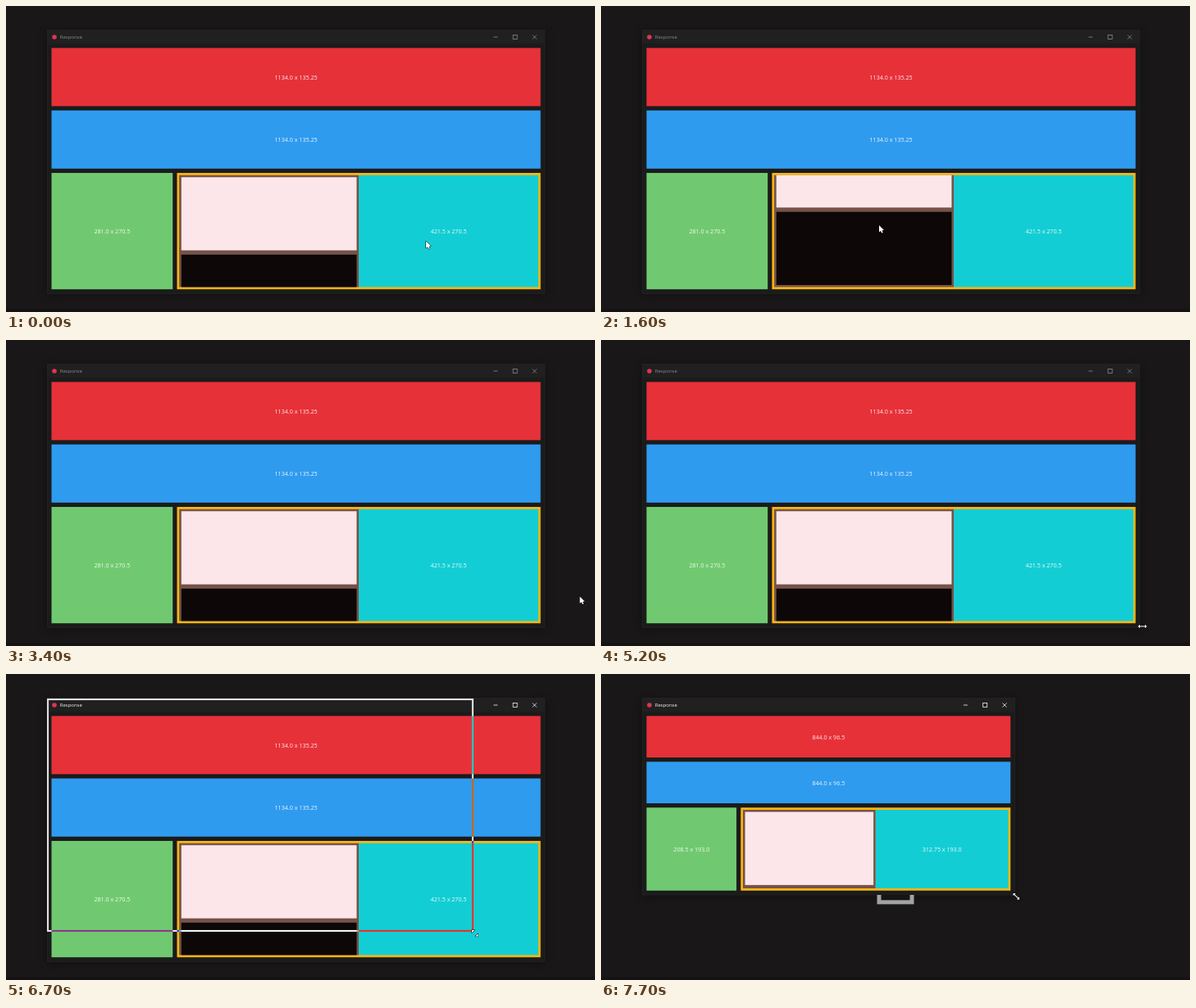
These frames come from a looping animation (718x374 px, 8 s). An HTML page with a canvas:

```html
<!DOCTYPE html>
<html lang="en">
<head>
<meta charset="utf-8">
<title>Response</title>
<style>
html, body { margin: 0; width: 100%; height: 100%; overflow: hidden; background: #191718; }
canvas { display: block; width: 718px; height: 374px; }
</style>
</head>
<body>
<canvas id="stage"></canvas>
<script>
const W = 718, H = 374, LOOP = 8000, STEP = 100;
const U = 0.5257; // stage pixels per layout unit
const GAP = 10 * U, EDGE = 5 * U;
const LEFT = 55.5, TOP = 51.3, BAR = 16.3;
const LARGE = { w: 1134, h: 561 }, SMALL = { w: 844, h: 406 };
const PRESS = 6000, RELEASE = 7400;
const FONT = '"Open Sans", "Noto Sans", sans-serif';

const canvas = document.getElementById('stage');
const ctx = canvas.getContext('2d');
const dpr = window.devicePixelRatio || 1;
canvas.width = W * dpr;
canvas.height = H * dpr;

const mix = (a, b, p) => a + (b - a) * p;
const ramp = (t, from, to) => Math.min(1, Math.max(0, (t - from) / (to - from)));
const ease = (t, from, to) => {
  const p = ramp(t, from, to);
  return p * p * (3 - 2 * p);
};
const rightOf = size => LEFT + size.w * U + GAP;
const bottomOf = size => TOP + size.h * U + GAP;

const scrollAt = t => 99.5 * (ease(t, 900, 1500) - ease(t, 1800, 2200));

const cornerAt = t => ({
  x: mix(rightOf(LARGE), rightOf(SMALL), ramp(t, 6139, 7122)),
  y: mix(bottomOf(LARGE), bottomOf(SMALL), ramp(t, 6344, 7139))
});

function pointerAt(t) {
  if (t >= PRESS) {
    const c = cornerAt(t);
    return { x: c.x + 1.8, y: c.y + 1.8 };
  }
  const pos = { x: 512, y: 287.5 };
  const move = (from, to, x, y) => {
    const p = ease(t, from, to);
    pos.x = mix(pos.x, x, p);
    pos.y = mix(pos.y, y, p);
  };
  move(100, 800, 339, 268);
  move(2700, 3400, 699.5, 313.5);
  move(3500, 4300, 648, 350);
  move(4500, 5200, 660, 350);
  move(5500, 5600, 660, 353);
  return pos;
}

// Null means the plain arrow, otherwise the turn of the resize arrow.
function pointerTurn(t) {
  if (t < 4300) return null;
  if (t < 4900) return Math.PI / 2;
  return t >= 5200 && t < 5600 ? 0 : Math.PI / 4;
}

function box(x, y, w, h, color) {
  ctx.fillStyle = color;
  ctx.fillRect(x, y, w, h);
}

function line(x1, y1, x2, y2) {
  ctx.beginPath();
  ctx.moveTo(x1, y1);
  ctx.lineTo(x2, y2);
  ctx.stroke();
}

function text(str, x, y, size, color, align) {
  ctx.font = `${size}px ${FONT}`;
  ctx.textAlign = align;
  ctx.fillStyle = color;
  ctx.fillText(str, x, y);
}

function label(w, h, cx, cy) {
  const dec = n => Number.isInteger(n) ? n.toFixed(1) : String(n);
  text(`${dec(w)} x ${dec(h)}`, cx, cy + 3.1, 7.15, 'rgba(255,255,255,0.9)', 'center');
}

function panel(x, y, w, h, color) {
  box(x, y, w * U, h * U, color);
  label(w, h, x + w * U / 2, y + h * U / 2);
}

function titleBar(right, active) {
  const ink = active ? '#f4f4f4' : '#8b8b8b', y = 38;
  ctx.fillStyle = '#e2344f';
  ctx.beginPath();
  ctx.arc(59, y, 2.8, 0, Math.PI * 2);
  ctx.fill();
  text('Response', 65.7, y + 2.2, 6, ink, 'left');

  const spacing = 23.8, r = 2.5, close = right - 12.5;
  const max = close - spacing, min = max - spacing;
  ctx.strokeStyle = ink;
  ctx.lineWidth = 0.8;
  line(min - r, y, min + r, y);
  ctx.strokeRect(max - r, y - r, 2 * r, 2 * r);
  line(close - r, y - r, close + r, y + r);
  line(close - r, y + r, close + r, y - r);
}

function scrollPane(x, y, w, h, scroll) {
  const half = w / 2 * U, width = w * U, height = h * U;
  const cardW = half - GAP - EDGE, cardH = 170 * U;
  box(x, y, width, height, '#fcb612');
  ctx.save();
  ctx.beginPath();
  ctx.rect(x + EDGE, y + EDGE, width - 2 * EDGE, height - 2 * EDGE);
  ctx.clip();
  box(x, y, half, height, '#765249');
  ['#fce6ea', '#0d0807'].forEach((color, i) => {
    box(x + GAP, y + GAP + i * (cardH + GAP) - scroll * U, cardW, cardH, color);
  });
  box(x + half, y, half, height, '#12ced4');
  ctx.restore();
  label(w / 2, h, x + half * 1.5 - EDGE / 2, y + height / 2);
}

function appWindow(size, scroll, active) {
  const x = LEFT - GAP, y = TOP - GAP - BAR;
  const right = rightOf(size), w = right - x, h = bottomOf(size) - y;
  const rowH = (size.h - 20) / 4, cellW = (size.w - 10) / 4;
  const rowY = i => TOP + i * (rowH * U + GAP);

  ctx.save();
  ctx.shadowColor = 'rgba(0,0,0,0.35)';
  ctx.shadowBlur = 10 * dpr;
  ctx.shadowOffsetY = 2 * dpr;
  box(x, y, w, h, '#1b1b1b');
  ctx.restore();
  box(x, y, w, BAR, '#202020');
  ctx.strokeStyle = '#292929';
  ctx.lineWidth = 0.6;
  ctx.strokeRect(x, y, w, h);

  titleBar(right, active);
  panel(LEFT, rowY(0), size.w, rowH, '#e73139');
  panel(LEFT, rowY(1), size.w, rowH, '#2f9bef');
  panel(LEFT, rowY(2), cellW, rowH * 2, '#70c970');
  scrollPane(LEFT + cellW * U + GAP, rowY(2), cellW * 3, rowH * 2, scroll);
}

// Inverting outline shown while the corner is dragged.
function dragOutline(corner) {
  const x = 51, y = 31;
  ctx.save();
  ctx.globalCompositeOperation = 'difference';
  ctx.strokeStyle = '#fff';
  ctx.lineWidth = 2.1;
  ctx.strokeRect(x, y, corner.x - 1 - x, corner.y - 1 - y);
  ctx.restore();
}

function shape(...points) {
  ctx.beginPath();
  points.forEach(([x, y]) => ctx.lineTo(x, y));
  ctx.closePath();
  ctx.lineJoin = 'round';
  ctx.strokeStyle = '#000';
  ctx.lineWidth = 1;
  ctx.stroke();
  ctx.fillStyle = '#fff';
  ctx.fill();
}

function pointer({ x, y }, turn, shaft) {
  ctx.save();
  ctx.translate(x, y);
  if (turn === null) {
    shape([0, 0], [0, 8.6], [2, 6.8], [3.3, 9.6], [4.7, 9], [3.5, 6.3], [6, 6.1]);
  } else {
    ctx.rotate(turn);
    for (const side of [-1, 1]) shape([side * 5.5, 0], [side * 3, -2.2], [side * 3, 2.2]);
    if (shaft) box(-3.2, -0.5, 6.4, 1, '#fff');
  }
  ctx.restore();
}

function draw(t) {
  const resized = t >= RELEASE, dragging = t >= PRESS && !resized;
  ctx.setTransform(dpr, 0, 0, dpr, 0, 0);
  box(0, 0, W, H, '#191718');
  box(0, 370, W, 4, '#141213');
  appWindow(resized ? SMALL : LARGE, scrollAt(t), t >= PRESS);
  if (resized) {
    const y = bottomOf(SMALL);
    box(336.5, y, 45, 11.4, '#a3a3a3');
    box(341.5, y, 35, 6.4, '#151515');
  }
  if (dragging) dragOutline(cornerAt(t));
  pointer(pointerAt(t), pointerTurn(t), !dragging);
}

const start = performance.now();
function frame() {
  const t = (performance.now() - start) % LOOP;
  draw(Math.floor(t / STEP) * STEP);
  requestAnimationFrame(frame);
}
frame();
</script>
</body>
</html>
```
